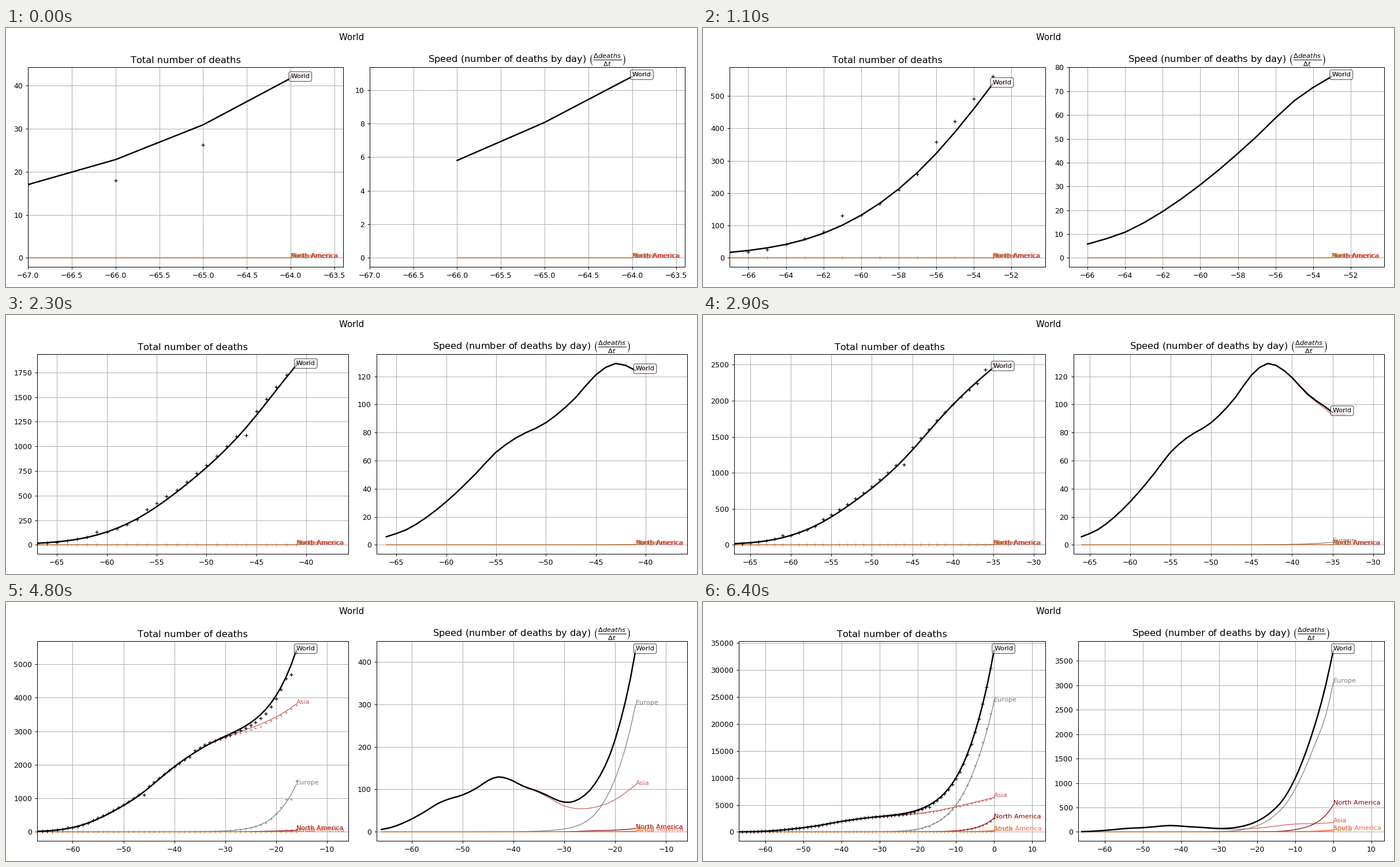
Recreate the animation shown at these times as a matplotlib script. Size 1197 by 450 pixels, loop 9400 ms.

```python
import numpy as np
import matplotlib.pyplot as plt
from matplotlib.animation import FuncAnimation

W, H, DPI = 1197, 450, 90
START, STEPS, FRAMES = -67, 65, 94
TOP, BOTTOM = 68.4, 415.2
PAD, TICK, EDGE = 13.5, 8.55, 3.1

plt.rcParams["text.kerning_factor"] = 6

days = np.arange(START, 1)
later = days[1:]


def smooth(knots):
    """Cubic Hermite curve through (day, value) knots, one value per day."""
    t, v = np.array(knots, float).T
    m = np.gradient(v, t)
    k = np.clip(np.searchsorted(t, later, "right") - 1, 0, len(t) - 2)
    h = t[k + 1] - t[k]
    s = (later - t[k]) / h
    rise = s * s * (3 - 2 * s)
    bend = s * (1 - s) * ((1 - s) * m[k] - s * m[k + 1])
    return v[k] + rise * (v[k + 1] - v[k]) + h * bend


def growth(knots):
    """The same on a log scale, for outbreaks that grow by a factor."""
    return np.exp(smooth([(t, np.log(v)) for t, v in knots]))


def total(speed, first=0):
    return first + np.concatenate([[0], np.cumsum(speed)])


world_speed = smooth([
    (-66, 5.8), (-64, 10.8), (-62, 19.5), (-60, 30.7), (-57, 51), (-55, 66),
    (-53, 76.2), (-50, 87), (-47, 105), (-45, 121), (-43, 129.2),
    (-41, 124.2), (-38, 107), (-35, 94.3), (-33, 83.5), (-31, 72.6),
    (-29, 69.5), (-27, 78), (-24, 113), (-20, 218), (-16, 426.4),
    (-13, 680), (-10, 1100), (-6, 1905), (-2, 3000), (0, 3712)])
europe_speed = growth([
    (-66, 1e-4), (-40, .4), (-35, 1.9), (-30, 7), (-26, 22.3), (-22, 75),
    (-16, 299), (-13, 520), (-10, 880), (-5, 1760), (-2, 2380), (0, 3058)])
north_speed = growth([
    (-66, 1e-4), (-30, .4), (-26, 2), (-20, 4.2), (-16, 8), (-10, 48),
    (-5, 165), (0, 554)])
south_speed = 45 * np.exp(.2 * later)
africa_speed = 20 * np.exp(.2 * later)

# Asia makes up the rest of the world until the other outbreaks take off
asia_speed = np.where(later < -35, world_speed - europe_speed, smooth([
    (-35, 92.4), (-33, 80), (-30, 60.8), (-27, 54.5), (-24, 58), (-20, 76),
    (-16, 110.5), (-13, 139), (-10, 161), (-5, 168), (0, 190)]))

world, asia = total(world_speed, 17), total(asia_speed, 17)
europe, north, south, africa = map(
    total, (europe_speed, north_speed, south_speed, africa_speed))
rest = north + south + africa

# Reported counts scatter around the smoothed totals
scatter = np.array([
    (-67, 1), (-66, .79), (-65, .85), (-64, 1.01), (-62, 1.07), (-61, 1.3),
    (-60, 1), (-57, .98), (-56, 1.11), (-53, 1.045), (-47, 1.02),
    (-46, .93), (-45, 1.03), (-37, .99), (-36, 1.03), (-30, .995),
    (-22, .965), (-18, .99), (-17, .94), (-16, .99), (-10, .98),
    (-1, 1.015), (0, .998)])
world_raw = world * np.interp(days, *scatter.T)
early = days < -22
europe_raw = np.where(early, europe, world_raw - .99 * asia - rest)
asia_raw = np.where(early, world_raw - europe - rest, .99 * asia)

# name, colour, smoothed total, reported total, speed
series = [
    ("Asia", "indianred", asia, asia_raw, asia_speed),
    ("Europe", "gray", europe, europe_raw, europe_speed),
    ("North America", "darkred", north, north, north_speed),
    ("South America", "tomato", south, south, south_speed),
    ("Africa", "peru", africa, africa, africa_speed),
    ("World", "black", world, world_raw, world_speed),
]

fig, (left, right) = plt.subplots(1, 2, figsize=(W / DPI, H / DPI), dpi=DPI)
fig.suptitle("World", fontsize=12)
left.set_title("Total number of deaths", fontsize=13)
right.set_title("Speed (number of deaths by day) "
                r"$\left(\frac{\Delta deaths}{\Delta t}\right)$", fontsize=13)
for ax in (left, right):
    ax.grid(True)


def add_series(name, color):
    main = name == "World"
    lw = 2 if main else 1
    box = dict(boxstyle="round", facecolor="white", alpha=.6) if main else None
    marks, = left.plot([], [], "+", color=color, ms=5 if main else 3,
                       mew=1 if main else .7)
    lines = [ax.plot([], [], color=color, lw=lw)[0] for ax in (left, right)]
    labels = [ax.text(0, 0, name, color=color, fontsize=9, bbox=box)
              for ax in (left, right)]
    return marks, lines, labels


artists = [add_series(name, color) for name, color, *_ in series]


def text_width(s):
    wide = {".": 3.97, "\u2212": 10.47}
    return sum(wide.get(c, 7.95) for c in s)


def tick_labels(axis, lo, hi):
    ticks = [t for t in axis.get_majorticklocs() if lo <= t <= hi]
    return ticks, axis.get_major_formatter().format_ticks(ticks)


def place(ax, x0, width):
    ax.set_position([x0 / W, 1 - BOTTOM / H, width / W, (BOTTOM - TOP) / H])


def layout():
    """Fit both panels around their tick labels."""
    lo, hi = left.get_xlim()
    ticks, names = tick_labels(left.xaxis, lo, hi)
    past = (ticks[-1] - hi) / (hi - lo) * 421.7 + text_width(names[-1]) / 2
    over = max(EDGE, past)
    room = [TICK + max(map(text_width, tick_labels(ax.yaxis, *ax.get_ylim())[1]))
            for ax in (left, right)]
    x0 = PAD + room[0]
    gap = over + PAD + room[1]
    width = (W - PAD - over - x0 - gap) / 2
    place(left, x0, width)
    place(right, x0 + width + gap, width)


def draw(i):
    n = min(i, STEPS - 1) + 4
    end = days[n - 1]
    peaks = [0, 0]
    for (_, _, tot, raw, speed), (marks, lines, labels) in zip(series, artists):
        marks.set_data(days[:n], raw[:n])
        curves = (days[:n], tot[:n]), (days[1:n], speed[:n - 1])
        for j, (x, y) in enumerate(curves):
            lines[j].set_data(x, y)
            labels[j].set_position((end, y[-1]))
            peaks[j] = max(peaks[j], y.max())
        peaks[0] = max(peaks[0], raw[:n].max())
    for ax, peak in zip((left, right), peaks):
        ax.set_xlim(START, end + .2 * (end - START))
        ax.set_ylim(-.05 * peak, 1.05 * peak)
    layout()
    return []


anim = FuncAnimation(fig, draw, frames=FRAMES, init_func=lambda: draw(0),
                     interval=100, repeat=True, repeat_delay=0, blit=False)
plt.show()
```
